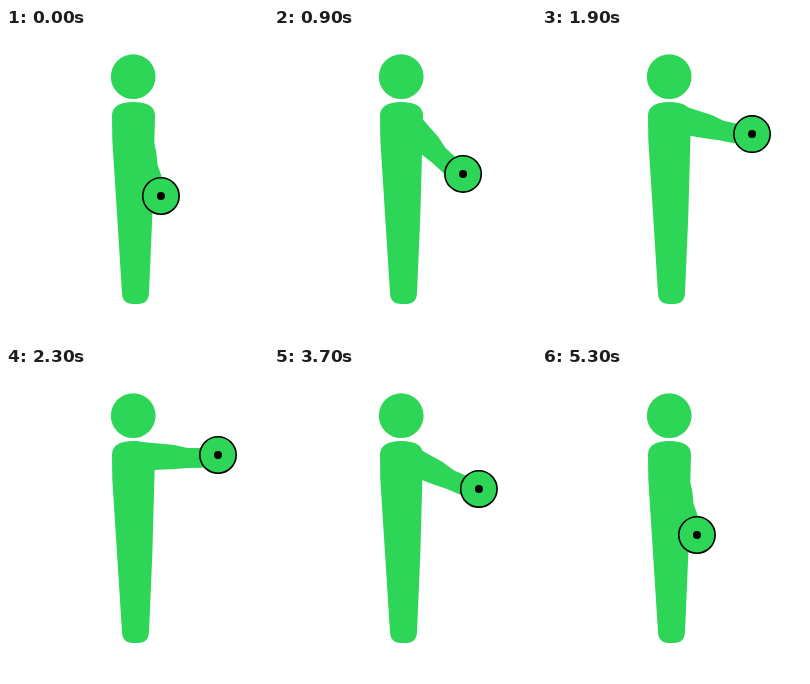
Write an HTML page with a canvas that moves like this. It is 262 px wide and 311 px high and loops after 6 s.

```html
<!DOCTYPE html>
<html lang="en">
<head>
<meta charset="utf-8">
<title>Front raise</title>
<style>
html, body { margin: 0; width: 100%; height: 100%; overflow: hidden; background: #fff; }
canvas { display: block; }
</style>
</head>
<body>
<canvas id="stage" width="262" height="311"></canvas>
<script>
const ctx = document.getElementById('stage').getContext('2d');
const GREEN = '#2ed657';
const LOOP = 6000, STEP = 100;
const SHOULDER = { x: 127.4, y: 88 };
const REACH = 84.6;
const LOW = 71 * Math.PI / 180;

// Arm outline relative to the shoulder, pointing right
const ARM = [[0, -14], [7, -13], [20, -12], [41, -10], [54, -7], [70, -7],
             [70, 12.7], [54, 13], [42, 14], [20, 15], [0, 15]];

const TORSO = new Path2D(
  'M118 75 Q127 73 137 75 C145 76.5 149 81 149 88 L148.3 115 L146.3 188 L143 265 ' +
  'Q142.5 276 132 276 L127 276 Q116.5 276 116 265 L106.3 112 L106 88 C106 81 110 76.5 118 75 Z');

function disc(x, y, r, fill) {
  ctx.beginPath();
  ctx.arc(x, y, r, 0, Math.PI * 2);
  ctx.fillStyle = fill;
  ctx.fill();
}

// Angle below horizontal: raise, hold, lower, rest
function armAngle(t) {
  if (t < 2300) return LOW * (1 - t / 2300);
  if (t < 2900) return 0;
  return LOW * Math.min(1, (t - 2900) / 2400);
}

function drawArm(angle) {
  ctx.save();
  ctx.translate(SHOULDER.x, SHOULDER.y);
  ctx.rotate(angle);
  ctx.beginPath();
  for (const [x, y] of ARM) ctx.lineTo(x, y);
  ctx.closePath();
  ctx.fillStyle = GREEN;
  ctx.fill();
  ctx.restore();
}

function drawWeight(angle) {
  const x = SHOULDER.x + REACH * Math.cos(angle);
  const y = SHOULDER.y + REACH * Math.sin(angle);
  disc(x, y, 18.2, GREEN);
  ctx.lineWidth = 1.6;
  ctx.strokeStyle = '#000';
  ctx.stroke();
  disc(x, y, 4, '#000');
}

function draw(t) {
  const angle = armAngle(t);
  ctx.fillStyle = '#fff';
  ctx.fillRect(0, 0, 262, 311);
  disc(127.2, 48.7, 22.4, GREEN);
  ctx.fill(TORSO);
  drawArm(angle);
  drawWeight(angle);
}

let start = null;
function tick(now) {
  if (start === null) start = now;
  const t = (now - start) % LOOP;
  draw(Math.floor(t / STEP) * STEP);
  requestAnimationFrame(tick);
}
draw(0);
requestAnimationFrame(tick);
</script>
</body>
</html>
```
